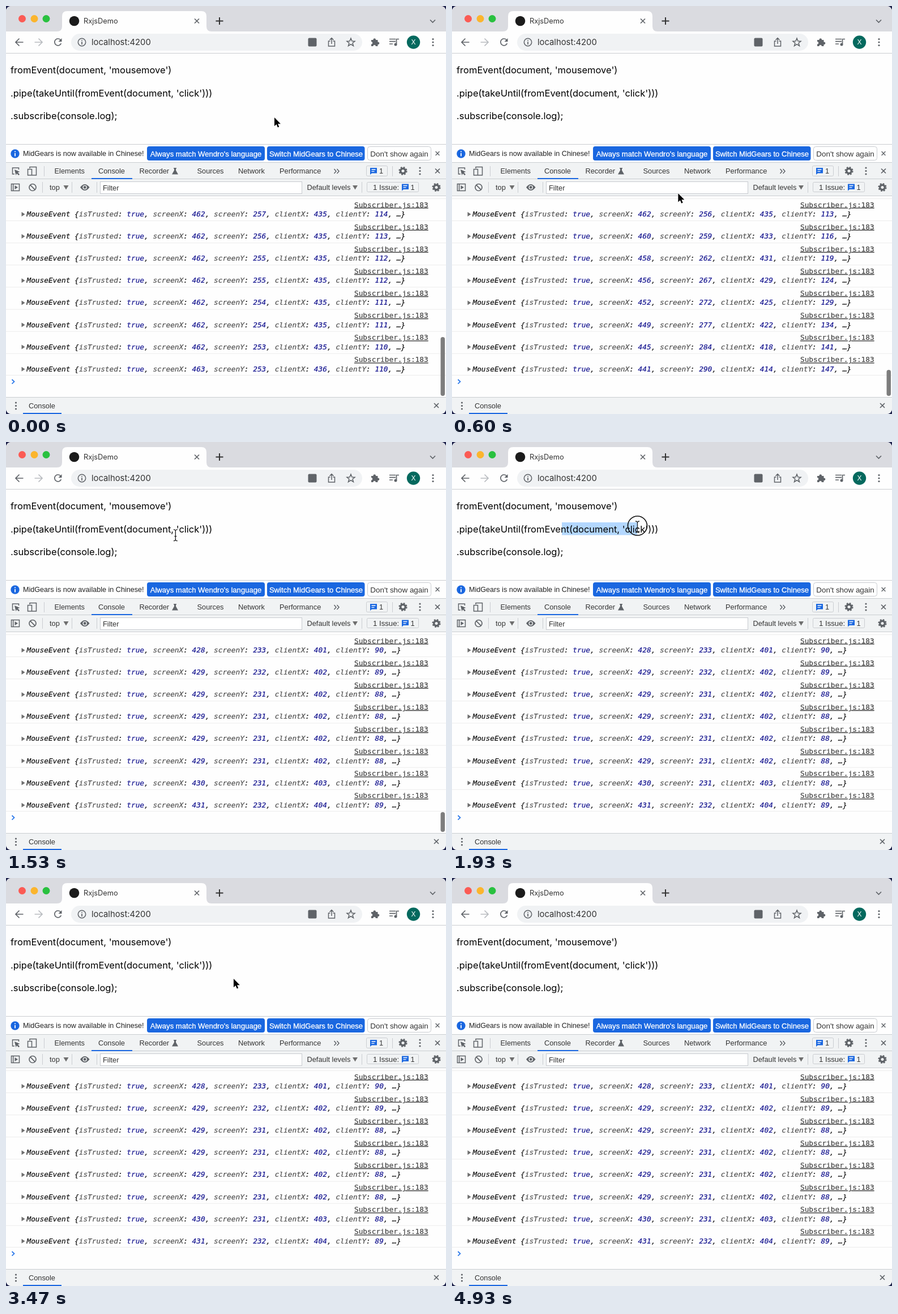
An HTML page that plays this animation: 777x721 px, repeating every 4990 ms.

```html
<!DOCTYPE html>
<html lang="en">
<head>
<meta charset="utf-8">
<title>RxjsDemo</title>
<style>
  html, body { margin: 0; height: 100%; overflow: hidden; background: #20244c; }
  svg { display: block; width: 100%; height: 100%; }
  text { white-space: pre; font: 12.8px "Liberation Sans", Arial, sans-serif; fill: #333; }
  .page { font: 16.5px Inter, sans-serif; fill: #000; }
  .mono { font: 12.78px "DejaVu Sans Mono", monospace; color: #111; }
  .mono, .mono tspan { fill: currentColor; stroke: currentColor; stroke-width: .2; }
  .it { font-style: italic; }
  .key { color: #505050; }
  .val { color: #14148f; }
  .link { color: #444; text-decoration: underline; }
  .btn { font-size: 13.1px; fill: #fff; stroke: #fff; stroke-width: .3; }
  .ln { fill: none; stroke: #5f6368; stroke-width: 1.7; }
  .thin { stroke-width: 1.5; }
  .rule { fill: none; stroke: #cacdd1; }
  .box { fill: #fff; stroke: #c8cbd0; }
  .grey { fill: #5f6368; }
  .blue { fill: #1a67e0; }
</style>
</head>
<body>
<svg viewBox="0 0 777 721">
  <defs>
    <path id="x" class="ln" d="M-4-4L4 4M4-4L-4 4"/>
    <path id="down" d="M-4.5-3.5H4.5L0 4Z" fill="#6e6e6e"/>
    <g id="dots" class="grey"><circle cy="-5.5" r="1.6"/><circle r="1.6"/><circle cy="5.5" r="1.6"/></g>
    <g id="gear" fill="none" stroke="#5f6368">
      <circle r="4.3" stroke-width="3.4"/>
      <circle r="6.5" stroke-width="2.2" stroke-dasharray="2.7 2.405"/>
    </g>
    <g id="msg"><path class="blue" d="M-6-5.5H6V4H-3L-6 6.5Z"/><path d="M-3.5-2.5H3.5M-3.5 .8H1.5" stroke="#fff" stroke-width="1.3"/></g>
    <clipPath id="win"><rect width="777" height="721" rx="9"/></clipPath>
  </defs>

  <g clip-path="url(#win)">
    <rect width="777" height="721" fill="#fefefe"/>

    <!-- Tab strip -->
    <rect width="777" height="45" fill="#dadbe0"/>
    <path d="M90 45Q99 45 99 36V18Q99 9 108 9H345Q354 9 354 18V36Q354 45 363 45Z" fill="#fefefe"/>
    <circle cx="28.5" cy="22.5" r="6.5" fill="#fb5b54"/>
    <circle cx="50" cy="22.5" r="6.5" fill="#fbb52d"/>
    <circle cx="71" cy="22.5" r="6.5" fill="#29c13f"/>
    <circle cx="120.5" cy="26.5" r="8.8" fill="#1b1b1b"/>
    <text x="137" y="31" style="font:12.8px Inter,sans-serif">RxjsDemo</text>
    <use href="#x" x="337" y="26.5"/>
    <path class="ln" d="M370.5 26.5H383.5M377 20V33" style="stroke:#333;stroke-width:2"/>
    <path class="ln" d="M749 24.5L753.5 29 758 24.5"/>

    <!-- Address bar -->
    <rect x="115" y="49" width="514" height="30" rx="15" fill="#f0f2f4"/>
    <path class="ln" d="M30.5 64H17.5M23.5 57.5L17 64 23.5 70.5"/>
    <path class="ln" d="M50.5 64H63.5M57.5 57.5L64 64 57.5 70.5" style="stroke:#b9bcc0"/>
    <path class="ln" d="M96.5 60A6 6 0 1 0 97.4 66"/>
    <path class="grey" d="M98.5 57V63H92.5Z"/>
    <circle class="ln thin" cx="134" cy="64" r="6.7"/>
    <path class="ln" d="M134 63V68M134 60V61.6"/>
    <text x="151" y="69" style="font:14.8px Inter,sans-serif">localhost:4200</text>
    <rect class="grey" x="533.5" y="56.5" width="15" height="15" rx="2"/>
    <path class="ln thin" d="M572.5 62H569.5V71H580.5V62H577.5M575 67V57M571.5 60L575 56.5 578.5 60"/>
    <path class="ln thin" d="M609 57L611 62 616 62.3 612 65.5 613.5 70.5 609 67.7 604.5 70.5 606 65.5 602 62.3 607 62Z"/>
    <path class="grey" d="M645 60H648.5A2.3 2.3 0 1 1 653 60H656.5V63.5A2.3 2.3 0 1 1 656.5 68V71H652.8A2.2 2.2 0 0 0 648.4 71H645V67.5A2.2 2.2 0 0 0 645 63Z"/>
    <path class="ln" d="M677 58.5H688M677 62.7H688M677 67H683M689.5 67.5V58.5H694"/>
    <circle class="grey" cx="688" cy="68" r="2.5"/>
    <circle cx="719.5" cy="64" r="11.7" fill="#04695e"/>
    <text x="719.5" y="68.3" text-anchor="middle" style="font-size:12px;fill:#fff">X</text>
    <use href="#dots" x="754" y="64"/>
    <path class="rule" d="M0 83.5H777"/>

    <!-- Page -->
    <rect id="sel" x="194" y="142" height="22.5" fill="#b3d7fe"/>
    <text class="page" x="8" y="119">fromEvent(document, 'mousemove')</text>
    <text class="page" x="8" y="159.5">.pipe(takeUntil(fromEvent(document, 'click')))</text>
    <text class="page" x="8" y="200">.subscribe(console.log);</text>

    <!-- Language notice -->
    <path class="rule" d="M0 244.5H777"/>
    <circle class="blue" cx="16" cy="261" r="7.7"/>
    <path d="M16 260V265.5M16 256.5V258.3" stroke="#fff" stroke-width="1.8"/>
    <text x="30" y="265" style="font-size:12.6px;fill:#222">MidGears is now available in Chinese!</text>
    <rect class="blue" x="249" y="248" width="208" height="25" rx="4"/>
    <text class="btn" x="353" y="266" text-anchor="middle">Always match Wendro's language</text>
    <rect class="blue" x="461" y="248" width="172.5" height="25" rx="4"/>
    <text class="btn" x="547.5" y="266" text-anchor="middle">Switch MidGears to Chinese</text>
    <rect class="box" x="638.5" y="248.5" width="112" height="24" rx="4"/>
    <text x="694.5" y="266" text-anchor="middle" style="font-size:13.4px">Don't show again</text>
    <use href="#x" transform="translate(762 260.5) scale(.85)"/>

    <!-- Panel tabs -->
    <rect y="277" width="777" height="58" fill="#f1f3f4"/>
    <path class="rule" d="M0 276.5H777M0 305.5H777M0 335.5H777M67.5 283V301M64.5 311V330M116.5 311V330M160.5 311V330M628.5 311V330M682.5 283V301"/>
    <path class="ln thin" d="M15 297H11.5V286H22.5V289"/>
    <path class="grey" d="M15 289L24.5 293 20.8 294.3 24 297.6 22.3 299.3 19 296 17.5 299.3Z"/>
    <path class="ln thin" d="M42 287V284.5H53.5V299H46M38.5 288.5H45.5V299H38.5Z"/>
    <text x="85.5" y="296">Elements</text>
    <text x="163" y="296">Console</text>
    <text x="235.5" y="296">Recorder</text>
    <path class="grey" d="M296 286H301V287.5H300V290.5L304 297.5H293L297 290.5V287.5H296Z"/>
    <text x="337.5" y="296">Sources</text>
    <text x="410" y="296">Network</text>
    <text x="483" y="296">Performance</text>
    <path class="ln thin" d="M579.5 288L583 292 579.5 296M584.5 288L588 292 584.5 296"/>
    <rect class="blue" x="151" y="304" width="72" height="2"/>
    <rect class="rule" x="636.5" y="282.5" width="37" height="18" rx="2"/>
    <use href="#msg" x="649" y="291.5"/>
    <text x="659" y="296">1</text>
    <use href="#gear" x="701" y="291.5"/>
    <use href="#dots" x="731" y="291.5"/>
    <use href="#x" x="762" y="291.5"/>

    <!-- Console toolbar -->
    <path class="ln thin" d="M9.5 314.5H23.5V326.5H9.5ZM12.7 314.5V326.5"/>
    <path class="grey" d="M15.5 317V324L21 320.5Z"/>
    <circle class="ln" cx="47" cy="320.5" r="6"/>
    <path class="ln" d="M42.7 316.2L51.3 324.8"/>
    <text x="77" y="325">top</text>
    <use href="#down" x="106" y="320.5"/>
    <path class="grey" d="M131 320.5Q139 309.5 147.5 320.5Q139 331.5 131 320.5Z"/>
    <circle class="grey" cx="139.2" cy="320.5" r="3.1" stroke="#f1f3f4" stroke-width="1.4"/>
    <rect class="box" x="166.5" y="310.5" width="356" height="21"/>
    <text x="171" y="325.5">Filter</text>
    <text x="531.5" y="325">Default levels</text>
    <use href="#down" x="616.5" y="320.5"/>
    <rect class="rule" x="637.5" y="311.5" width="91" height="17" rx="2"/>
    <text x="648" y="325" style="font-size:13.2px">1 Issue:</text>
    <use href="#msg" x="705" y="320"/>
    <text x="714.5" y="325">1</text>
    <use href="#gear" x="760" y="320.5"/>

    <!-- Log -->
    <g id="rows"></g>
    <path d="M0 652.5H777" stroke="#ececec"/>
    <path d="M10.5 660L14.5 663.8 10.5 667.6" fill="none" stroke="#2f7bea" stroke-width="1.8"/>
    <rect id="thumb" x="767.5" width="7.5" rx="3.75" fill="#7d7d7d"/>

    <!-- Drawer -->
    <rect y="692" width="777" height="29" fill="#f1f3f4"/>
    <path class="rule" d="M0 691.5H777"/>
    <use href="#dots" x="17.5" y="706.5"/>
    <text x="40" y="710.5">Console</text>
    <rect class="blue" x="30" y="719" width="68" height="2"/>
    <use href="#x" x="760" y="706"/>

    <!-- Pointer -->
    <g id="pointer">
      <circle id="ring" r="17" fill="none" stroke="#111" stroke-width="1.7"/>
      <path id="arrow" transform="translate(0 -1) scale(.93)" d="M0 0V16.5L3.8 13 6.3 18.8 8.9 17.7 6.5 12H11.8Z" stroke="#fff" stroke-width="1.2" paint-order="stroke"/>
      <path id="beam" d="M-3.5-8Q0-8 0-5V9Q0 12-3.5 12M3.5-8Q0-8 0-5M0 9Q0 12 3.5 12M-2 4H2" fill="none" stroke="#222" stroke-width="1.3"/>
    </g>
  </g>
</svg>
<script>
const LOOP = 4990, STEP = 200 / 3, ROWS = 8;
const $ = id => document.getElementById(id);

// Pointer stops: arrival time, x, y, easing power
const stops = [
  [-140, 464, 206], [-62, 464.7, 201, .8], [0, 474, 198], [260, 464, 205],
  [333, 442, 241, 1.4], [400, 412, 305], [530, 396, 368], [780, 408, 240],
  [915, 428, 180, .7], [936, 429, 178], [968, 429, 178], [990, 431, 178.5],
  [1400, 431, 178.5], [1640, 194, 150], [1670, 194, 148], [1960, 341, 148],
  [2360, 341, 149], [2667, 274, 169], [3467, 402, 179], [4340, 402, 179],
  [4720, 600, -30]
];
const DRAG = { start: 1670, end: 1960, release: 2070, clear: 2360 };

// Mouse events fire at a fixed rate in two spells inside the page
const RATE = 10.4, LAG = 62;
const spells = [{ start: -135, count: 46 }, { start: 780, count: 21 }];
const eventTimes = spells.flatMap(s =>
  Array.from({ length: s.count }, (_, i) => s.start + i * RATE));

function pointerAt(t) {
  const i = stops.findIndex(s => s[0] >= t);
  if (i < 0) return stops.at(-1).slice(1);
  const [t0, x0, y0] = stops[i - 1];
  const [t1, x1, y1, power = 1] = stops[i];
  const f = ((t - t0) / (t1 - t0)) ** power;
  return [x0 + (x1 - x0) * f, y0 + (y1 - y0) * f];
}

const show = (id, on) => $(id).setAttribute("visibility", on ? "visible" : "hidden");
const pair = (key, val) =>
  `<tspan class="key">${key}</tspan>: <tspan class="val">${val}</tspan>, `;

function row(time, i) {
  const [px, py] = pointerAt(time);
  const x = Math.round(px / 1.067), y = Math.round((py - 84) / 1.067);
  const top = 340.5 + 39.1 * i;
  return `<path d="M0 ${top}H777" stroke="#ececec"/>
    <text class="mono link" x="615" y="${top + 15}">Subscriber.js:183</text>
    <path d="M27.5 ${top + 23.5}v8l6-4Z" fill="#6e6e6e"/>
    <text class="mono it" x="36.5" y="${top + 31.5}">MouseEvent {${
      pair("isTrusted", true) + pair("screenX", x + 27) + pair("screenY", y + 143) +
      pair("clientX", x) + pair("clientY", y)}…}</text>`;
}

let drawn;
function drawLog(count) {
  if (count === drawn) return;
  drawn = count;
  $("rows").innerHTML = eventTimes.slice(count - ROWS, count).map(row).join("");
  const h = 3120 / (count + 22);
  $("thumb").setAttribute("y", 689 - h);
  $("thumb").setAttribute("height", h);
}

function draw(now) {
  const t = Math.floor((now % LOOP + 4) / STEP) * STEP;
  const [x, y] = pointerAt(t);
  const overText = y > 142 && y < 164 && x < 365;
  const dragging = t >= DRAG.start && t < DRAG.release;

  drawLog(eventTimes.filter(e => e <= t - LAG).length);
  show("thumb", t < 1600);
  $("pointer").setAttribute("transform", `translate(${x} ${y})`);
  show("arrow", !overText);
  show("beam", overText);
  show("ring", dragging || (t > 1130 && t < 1270));
  show("sel", t >= DRAG.start && t < DRAG.clear);
  $("sel").setAttribute("width", Math.max(0, pointerAt(Math.min(t, DRAG.end))[0] - 194));
}

const began = performance.now();
(function tick() {
  draw(performance.now() - began);
  requestAnimationFrame(tick);
})();
</script>
</body>
</html>
```
